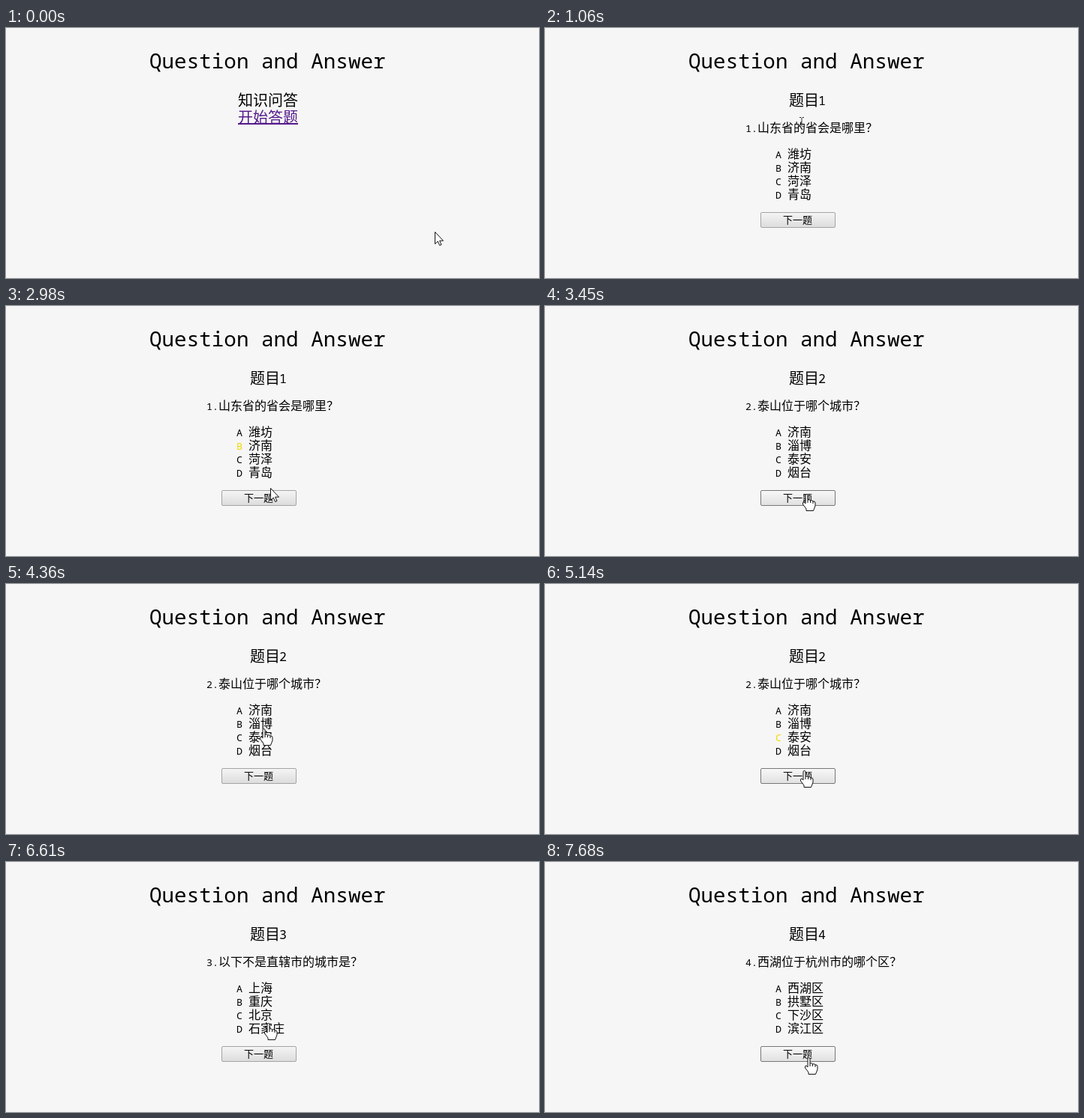
Animation of 710x334 px, one loop 8 s. Source, as an HTML page:

```html
<!DOCTYPE html>
<html lang="zh-CN">
<head>
<meta charset="utf-8">
<title>Question and Answer</title>
<style>
  html, body { margin: 0; width: 100%; height: 100%; overflow: hidden; background: #f6f6f6; }
  svg { display: block; cursor: default; }
  text { font-family: "Noto Sans CJK SC", "Noto Sans CJK", sans-serif; font-weight: 300; white-space: pre; }
  .latin { font-family: "Noto Sans Mono", "DejaVu Sans Mono", monospace; }
  .title { font-size: 27.6px; font-weight: 400; }
  .chosen { fill: #f0d800; }
  .pointer { fill: #fff; stroke: #111; stroke-linejoin: round; }
</style>
</head>
<body>
<svg width="710" height="334" viewBox="0 0 710 334">
  <defs>
    <linearGradient id="idle" x2="0" y2="1"><stop stop-color="#f5f5f5"/><stop offset="1" stop-color="#dcdcdc"/></linearGradient>
    <linearGradient id="hover" x2="0" y2="1"><stop stop-color="#f8f8f8"/><stop offset="1" stop-color="#e0e0e0"/></linearGradient>
    <linearGradient id="pressed" x2="0" y2="1"><stop stop-color="#dcdcdc"/><stop offset="1" stop-color="#f0f0f0"/></linearGradient>
  </defs>
  <text class="latin title" x="191" y="54">Question and Answer</text>
  <g id="pages"></g>
  <g id="button">
    <rect id="face" x="287.5" y="246.5" width="99" height="20" rx="1.5"/>
    <text x="317" y="261" font-size="13">下一题</text>
  </g>
  <g id="cursor">
    <path id="arrow" class="pointer" d="M.5 .5V16.5L4.2 13 6.7 18.5 9 17.5 6.6 12.2H11.5Z"/>
    <g id="hand">
      <path class="pointer" d="M-2 13V2Q-2 .5 -.5 .5T1 2V8Q4 7 4.5 9Q7.5 8 8 10Q11 9.500 11 12V16L8.500 22.500H-1V20L-5.500 14Q-6 11 -4 11Z"/>
      <path d="M1 8V12M4.500 9V12M8 10V13" stroke="#111" fill="none"/>
    </g>
    <path id="beam" d="M-3 -6.500H-1L0 -5.500 1 -6.500H3M0 -5.500V4.500M-3 5.500H-1L0 4.500 1 5.500H3" stroke="#333" fill="none"/>
  </g>
</svg>
<script>
const LOOP = 8000;
const questions = [
  ["山东省的省会是哪里？", "潍坊", "济南", "菏泽", "青岛"],
  ["泰山位于哪个城市？", "济南", "淄博", "泰安", "烟台"],
  ["以下不是直辖市的城市是？", "上海", "重庆", "北京", "石家庄"],
  ["西湖位于杭州市的哪个区？", "西湖区", "拱墅区", "下沙区", "滨江区"]
];
const pageStarts = [0, 990, 3450, 5600, 7680];
// One entry per question: time of the choice and the chosen row
const choices = [[2620, 1], [4680, 2], [7070, 3]];
const presses = [[3290, 3370], [5370, 5450], [7530, 7600]];
// start, end, number of steps, destination x, y
const moves = [
  [70, 360, 5, 342, 126],
  [1610, 1910, 5, 357, 208],
  [2060, 2370, 5, 340, 180],
  [2740, 2980, 4, 352, 243],
  [3060, 3140, 2, 349, 251],
  [3750, 4360, 9, 344, 193],
  [4760, 5140, 6, 346, 249],
  [5980, 6610, 9, 350, 215],
  [7150, 7450, 5, 352, 261]
];

const $ = id => document.getElementById(id);
const show = (el, on) => { el.style.display = on ? "" : "none"; };

function add(parent, tag, attrs, content = "") {
  const el = document.createElementNS("http://www.w3.org/2000/svg", tag);
  for (const key in attrs) el.setAttribute(key, attrs[key]);
  el.textContent = content;
  return parent.appendChild(el);
}

// Latin characters take half the width of a Chinese one
function write(parent, x, y, size, latin, chinese) {
  const head = add(parent, "text", { x, y, class: "latin", "font-size": size / 1.2 }, latin);
  add(parent, "text", { x: x + latin.length * size / 2, y, "font-size": size }, chinese);
  return head;
}

const home = add($("pages"), "g", {});
write(home, 309, 104, 20, "", "知识问答");
const link = add(home, "g", { fill: "#551a8b" });
write(link, 309, 126.5, 20, "", "开始答题");
add(link, "rect", { x: 309, y: 127, width: 80, height: 2 });

const letters = [];
const pages = [home, ...questions.map(([question, ...options], i) => {
  const page = add($("pages"), "g", {});
  write(page, 325, 104, 20, "", "题目");
  write(page, 364, 103, 20, String(i + 1), "");
  write(page, 267, 139, 16, `${i + 1}.`, question);
  letters.push(options.map((option, row) =>
    write(page, 307, 173.5 + 18 * row, 16, "ABCD"[row] + " ", option)));
  return page;
})];

function positionAt(t) {
  let x = 571, y = 272;
  for (const [start, end, steps, toX, toY] of moves) {
    if (t < start) break;
    const step = Math.min(steps - 1, Math.floor((t - start) / (end - start) * (steps - 1) + 1e-6));
    const p = (step + 1) / steps;
    x += (toX - x) * p;
    y += (toY - y) * p;
    if (p < 1) break;
  }
  return [Math.round(x), Math.round(y)];
}

function cursorKind(page, x, y) {
  if (!page) return x >= 309 && x < 389 && y >= 109 && y < 129 ? "hand" : "arrow";
  if (y >= 246 && y < 267) return "hand";
  if (y >= 120 && y < 143) return "beam";
  const row = Math.floor((y - 159) / 18);
  const option = row >= 0 && row < 4 && questions[page - 1][row + 1];
  return option && x < 323 + 16 * option.length ? "hand" : "arrow";
}

function draw(t) {
  const page = pageStarts.filter(start => t >= start).length - 1;
  pages.forEach((el, i) => show(el, i === page));
  link.setAttribute("fill", t >= 680 && t < 760 ? "#ee0000" : "#551a8b");
  choices.forEach(([time, row], i) => letters[i][row].classList.toggle("chosen", t >= time));

  const [x, y] = positionAt(t);
  // The text cursor appears one step after the first question
  const kind = t >= 990 && t < 1060 ? "hand" : cursorKind(page, x, y);
  for (const name of ["arrow", "hand", "beam"]) show($(name), name === kind);
  $("cursor").setAttribute("transform", `translate(${x} ${y})`);

  const hovered = page > 0 && y >= 246 && y < 267;
  const pressed = presses.some(([from, to]) => t >= from && t < to);
  show($("button"), page > 0);
  $("face").setAttribute("fill", `url(#${pressed ? "pressed" : hovered ? "hover" : "idle"})`);
  $("face").setAttribute("stroke", hovered ? "#777" : "#a4a4a4");
}

function tick() {
  draw(performance.now() % LOOP);
  requestAnimationFrame(tick);
}
tick();
</script>
</body>
</html>
```
